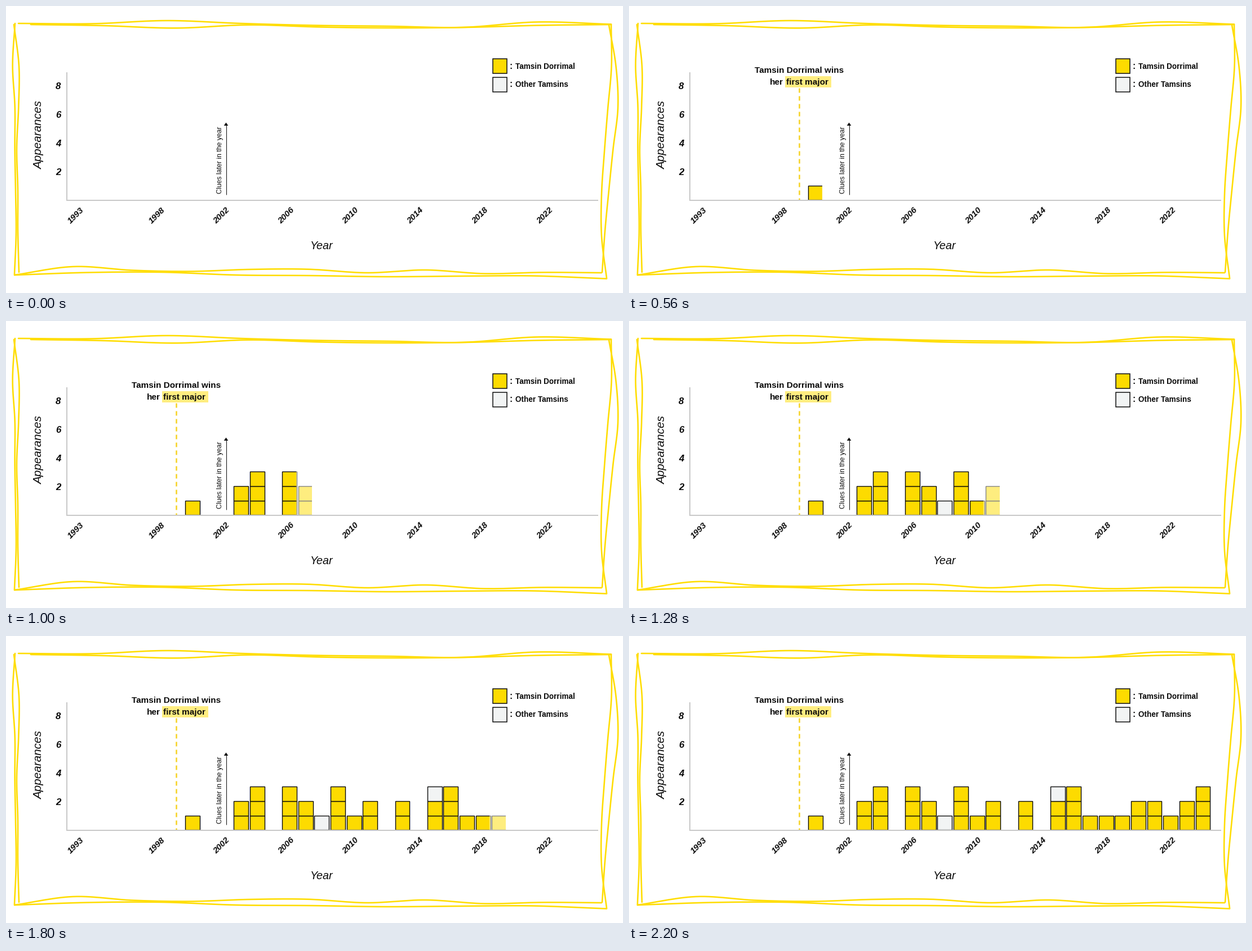
Animation of 1095 by 511 pixels, one loop 2480 ms. Source, as a matplotlib script:

```python
import math

import matplotlib.pyplot as plt
import numpy as np
from matplotlib.animation import FuncAnimation
from matplotlib.patches import Polygon, Rectangle

W, H, DPI = 1095, 511, 100
STEP_MS, FRAMES = 40, 62
PX = 72 / DPI  # points per pixel

YELLOW, LINE_YELLOW, PALE = "#fddb00", "#ffdd00", "#ffed80"
OTHER, GREY, INK = "#f2f4f4", "#c8c8c8", "#0a0a0a"

# One stack per year from 2000 on: y = yellow box, o = other, - = none.
STACKS = ("y - - yy yyy - yyy yy o yyy y yy - yy - yyo yyy "
          "y y y yy yy y yy yyy").split()
LEFT, PITCH, BOX, BASE = 318.4, 28.63, 25.8, 345.4

plt.rcParams["font.family"] = "Liberation Sans"
fig = plt.figure(figsize=(W / DPI, H / DPI), dpi=DPI, facecolor="white")
ax = fig.add_axes([0, 0, 1, 1])
ax.set_xlim(0, W)
ax.set_ylim(H, 0)
ax.axis("off")


def label(x, y, s, px, **kw):
    kw = {"ha": "left", "va": "baseline", "color": INK, "zorder": 6, **kw}
    return ax.text(x, y, s, fontsize=px * PX, **kw)


def line(xs, ys, color, width, **kw):
    kw = {"zorder": 5, "solid_capstyle": "butt", **kw}
    return ax.plot(xs, ys, color=color, lw=width * PX, **kw)[0]


def box(x, y, w, h, color, edge="none", width=0.0, z=2, **kw):
    patch = Rectangle((x, y), w, h, facecolor=color, edgecolor=edge,
                      lw=width * PX, zorder=z, **kw)
    return ax.add_patch(patch)


def wavy(start, end, *levels):
    """Smooth curve from start to end through evenly spaced levels."""
    n = len(levels)
    along = np.linspace(start, end, 12 * n)
    pos = np.linspace(0, n - 1, 12 * n)
    k = np.minimum(pos.astype(int), n - 2)
    t = pos - k
    v = np.array(levels, float)
    slope = np.gradient(v)
    ease = t * t * (3 - 2 * t)
    across = (v[k] + (v[k + 1] - v[k]) * ease
              + slope[k] * t * (1 - t) ** 2
              - slope[k + 1] * t * t * (1 - t))
    return along, across


def draw_border():
    rows = (
        wavy(22, 1074, 31, 31.5, 26, 31, 34.5, 36, 38, 28.5, 32.5),
        wavy(44, 1074, 33, 35, 39.3, 33.7, 37.5, 39, 38, 34.5, 33),
        wavy(15, 1057, 479, 464, 470.5, 472.5, 469, 468.7, 475, 470, 476.5,
             474.3, 475),
        wavy(15, 1066, 479, 474.5, 474, 479, 480, 482, 481, 480.5, 485.5),
    )
    sides = (
        wavy(31, 478, 16, 11.7, 15.8, 15.7, 17, 18, 15),
        wavy(33, 474, 14, 23, 22.3, 19, 21, 21, 23),
        wavy(34, 474, 1070, 1082.5, 1086, 1077.5, 1070, 1063, 1058),
        wavy(33, 485, 1074, 1074.5, 1068, 1062, 1057, 1057, 1066),
    )
    for x, y in [*rows, *((across, along) for along, across in sides)]:
        line(x, y, LINE_YELLOW, 2.6, solid_capstyle="round")


def draw_axes():
    line([108, 108], [118, 346.5], GREY, 2)
    line([107, 1050.5], [345.7, 345.7], GREY, 2)
    for value in range(2, 9, 2):
        label(97.5, 352.5 - 25.6 * value, str(value), 16.8, ha="right",
              weight="bold", style="italic")
    for year in (1993, *range(1998, 2023, 4)):
        label(267.5 + 28.7 * (year - 1998), 373, str(year), 15.3,
              ha="center", va="center", rotation=45, rotation_mode="anchor",
              weight="bold", style="italic")
    label(64, 291, "Appearances", 20.6, style="italic", rotation=90,
          rotation_mode="anchor")
    label(560.5, 433, "Year", 19.8, style="italic", ha="center")


def draw_note():
    label(383, 334.5, "Clues later in the year", 12.2, rotation=90,
          rotation_mode="anchor")
    line([390.5, 390.5], [336, 212], INK, 1)
    ax.add_patch(Polygon([(386.7, 213), (394.3, 213), (390.5, 207.5)],
                         color=INK, lw=0, zorder=6))


def draw_legend():
    rows = ((94.3, YELLOW, "Tamsin Dorrimal"), (127.1, OTHER, "Other Tamsins"))
    for y, color, name in rows:
        box(863.6, y, 25.6, 25.6, color, INK, 1.5)
        label(893.5, y + 17.2, ":", 15.5, weight="bold")
        label(904, y + 17.2, name, 13.5, weight="bold")


def draw_bars():
    for i, stack in enumerate(STACKS):
        for row, kind in enumerate(stack.strip("-"), 1):
            box(LEFT + PITCH * i, BASE - BOX * row, BOX, BOX,
                YELLOW if kind == "y" else OTHER, INK, 1.4)


def draw_callout():
    bold = {"weight": "bold"}
    dash = line([302, 302], [146, 345], "#f7d42c", 2.6, zorder=4,
                linestyle=(0, (8 / 2.6, 6 / 2.6)), dash_capstyle="butt")
    return [
        box(277, 125.5, 82, 19.5, PALE),
        dash,
        label(302.3, 119.3, "Tamsin Dorrimal wins", 15.3, ha="center", **bold),
        label(250, 140, "her", 15.3, **bold),
        label(279, 140, "first major", 15.3, **bold),
    ]


draw_border()
draw_axes()
draw_note()
draw_legend()
draw_bars()
callout = draw_callout()

# White covers hide the part of the bars that is not revealed yet.
START, END = 312, 1045
curtain = box(START, 262, 0, 88, "white", z=3)
veil = box(START, 262, 0, 88, "white", z=3, alpha=0.5)


def edge(column):
    x = LEFT + 24.5 + PITCH * column
    return min(max(x, START), END)


def update(i):
    t = i * STEP_MS
    fade = min(max((t - 40) / 360, 0), 1)
    for artist in callout:
        artist.set_alpha(fade)

    # One column every two ticks; the first tick shows it half blended.
    tick = math.floor(t * 0.03 + 0.45) - 16
    column = tick // 2
    right = edge(column)
    half = tick % 2 == 0 and column < len(STACKS)
    left = edge(column - 1) if half else right
    curtain.set_x(right)
    curtain.set_width(END - right)
    veil.set_x(left)
    veil.set_width(right - left)
    return [*callout, curtain, veil]


def reset():
    return update(0)


anim = FuncAnimation(fig, update, frames=FRAMES, init_func=reset,
                     interval=STEP_MS, repeat=True, repeat_delay=0)
plt.show()
```
